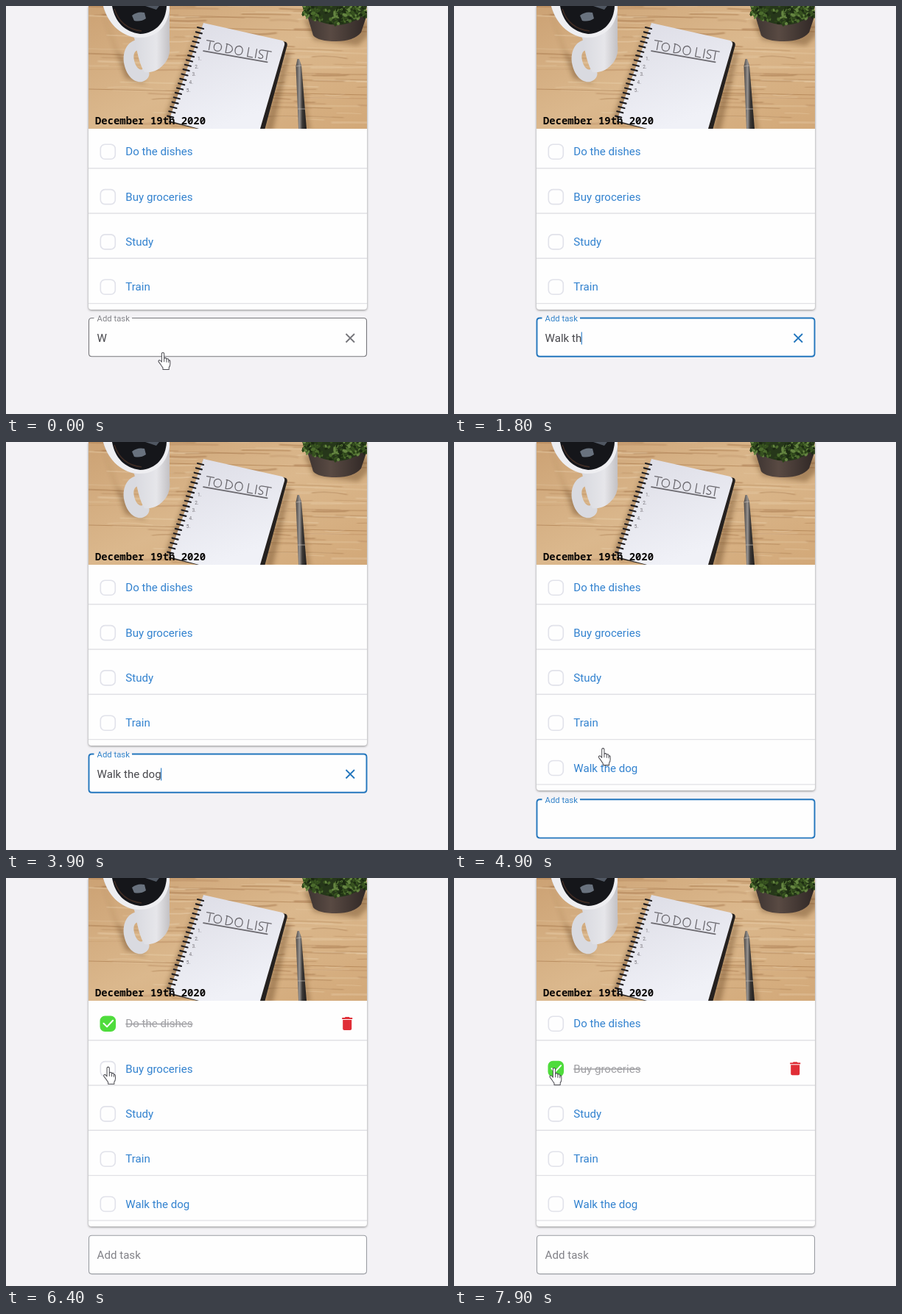
Write an HTML page that moves like this. It is 600 px wide and 555 px high and loops after 8000 ms.

```html
<!DOCTYPE html>
<html lang="en">
<head>
<meta charset="utf-8">
<title>To do list</title>
<style>
  html, body { margin: 0; width: 100%; height: 100%; overflow: hidden; background: #f3f2f5; }
  svg { display: block; width: 600px; height: 555px; font-family: Roboto, Arial, sans-serif; font-size: 15.1px; }
  #card { fill: #fefefe; filter: drop-shadow(0 1px 1.5px rgba(0,0,0,.42)); }
  .done { fill: #a0a0a4; text-decoration: line-through; }
  .open { fill: #3282cf; }
  .date { font: bold 13.9px "Noto Sans Mono", "DejaVu Sans Mono", monospace; }
  .pencil { fill: none; stroke: #6b696f; stroke-width: 1.3; stroke-linecap: round; stroke-linejoin: round; }
</style>
</head>
<body>
<svg viewBox="0 0 600 555">
  <defs>
    <linearGradient id="wood" x2="1" y2="1">
      <stop offset="0" stop-color="#cca274"/><stop offset=".5" stop-color="#dbb88d"/><stop offset="1" stop-color="#d2a878"/>
    </linearGradient>
    <linearGradient id="mug">
      <stop offset="0" stop-color="#c6c7cd"/><stop offset=".45" stop-color="#d8d9df"/><stop offset=".8" stop-color="#e6e6ea"/><stop offset="1" stop-color="#c2c0c3"/>
    </linearGradient>
    <linearGradient id="paper" x2=".4" y2="1">
      <stop offset="0" stop-color="#dcdce5"/><stop offset="1" stop-color="#f0f1f7"/>
    </linearGradient>
    <linearGradient id="metal">
      <stop offset="0" stop-color="#4b4745"/><stop offset=".35" stop-color="#96928f"/><stop offset=".6" stop-color="#3b3836"/><stop offset="1" stop-color="#1f1c1b"/>
    </linearGradient>
    <linearGradient id="pot">
      <stop offset="0" stop-color="#3d3431"/><stop offset=".4" stop-color="#594a43"/><stop offset="1" stop-color="#2f2725"/>
    </linearGradient>
    <clipPath id="photoClip"><rect x="112" width="378" height="167"/></clipPath>
    <filter id="soft"><feGaussianBlur stdDeviation="3"/></filter>
    <filter id="blend"><feGaussianBlur stdDeviation="1.2 .5"/></filter>
  </defs>

  <path id="card"/>

  <g clip-path="url(#photoClip)">
    <rect x="112" width="378" height="167" fill="url(#wood)"/>
    <g id="grain" fill="none" filter="url(#blend)"/>
    <g filter="url(#soft)" fill="#5e3c1e" opacity=".4">
      <path d="M128 0L146 52L162 98L190 106L150 60Z"/>
      <path d="M262 26L216 152L226 160Z"/>
      <path d="M380 60L350 170L362 170L386 64Z"/>
      <path d="M399 82L407 170L413 170Z"/>
      <path d="M404 18L418 46L478 54L492 40V20Z"/>
    </g>

    <path d="M178 46C165 48 158 61 160 77C163 95 174 105 185 103C192 101 196 95 194 89L188 84C183 90 176 84 174 74C172 65 175 59 182 60Z" fill="#d9dae0"/>
    <path d="M132 0C138 24 156 38 174 43C178 62 181 80 188 90Q205 92 217 76Q224 66 222 50V0Z" fill="url(#mug)"/>
    <path d="M132 0C140 27 158 42 181 43C203 43 218 30 222 6V0Z" fill="#eeeef1"/>
    <path d="M144 0C148 22 161 35 182 38C204 37 217 21 218 0Z" fill="#15161a"/>
    <path d="M147 4C153 22 165 32 184 34" fill="none" stroke="#3f2c24" stroke-width="1.6"/>
    <path d="M171 13Q178 7 188 9L190 17Q183 22 174 20Z" fill="#8d9aa9" opacity=".7"/>
    <path d="M189 0L204 5L208 0Z" fill="#6a7482" opacity=".7"/>

    <path d="M268 24L380 49Q383 51 381 56L351 169H268L221 158Z" fill="#25211f"/>
    <path d="M268 23L375 47Q379 49 378 53L345 167H262L221 156Z" fill="url(#paper)"/>
    <g id="rings" stroke="#1f1d20" stroke-width="2.2" stroke-linecap="round"/>
    <g class="pencil" transform="translate(270.5 58.5) rotate(10)">
      <path d="M0-12H10M5-12V0M16-11C9-10 10 0 16 0C23 0 23-11 16-11ZM28-12V0C40 0 39-12 27-12M45-12C38-11 39 0 45 0C52 0 52-12 45-12ZM58-12V0H65M69-12V0M79-12C71-13 72-7 76-6C81-4 79 1 73-1M79-12H89M84-12V0"/>
      <path d="M-2 3H86" stroke-width="1.7"/>
    </g>
    <g id="numbers" fill="#77747a" font-size="6.5"/>

    <path d="M395.5 72L398 72L401 81L408 167H397L393.5 82Z" fill="url(#metal)"/>
    <path d="M394 82L401 81M396 140L406 140" stroke="#bdb5ad" stroke-width=".8"/>

    <path d="M408 10L417 40Q424 48 448 48Q472 48 482 36L490 12Z" fill="url(#pot)"/>
    <path d="M402 0Q406 13 420 19Q450 32 473 20Q488 14 490 0Z" fill="#26371a"/>
    <g id="leaves"/>
  </g>
  <text class="date" x="121" y="161" fill="#080605">December 19th 2020</text>

  <g id="rows"></g>
  <g id="field"></g>
  <path id="hand" fill="#fff" stroke="#4a4a50" stroke-width="1.2" stroke-linejoin="round"
    d="M-2 1.5Q-2-.5 0-.5Q2-.5 2 1.5V9Q2 7 4 7Q6 7 6 9V10Q6 8 8 8.2Q9.5 8.5 9.5 10.5V11Q12 9.5 12 12.5V16Q12 19 10 21V24H0V21.5Q-2 19-3.5 17L-7 13Q-8 11-6 10.5Q-4.5 10-2 13ZM2 9V13M6 10V13.5M9.5 11V14"/>
</svg>
<script>
const LOOP = 8000, FRAME = 100, PITCH = 61.3;
const FOCUS = 300, TYPING = 1020, KEY = 130, SUBMIT = 4200, BLUR = 5500;
const TASK = 'Walk the dog';
const TYPED = TYPING + KEY * (TASK.length - 1);
const LABELS = ['Do the dishes', 'Buy groceries', 'Study', 'Train', TASK];
const CHECKS = [{ on: 5500, off: 7200 }, { on: 6600, off: Infinity }];
const POINTER = [[4700, 216, 470], [5400, 147, 203], [5900, 147, 203], [6500, 138, 262],
  [6700, 138, 262], [6950, 150, 187], [7200, 150, 187], [7700, 136, 259], [8000, 136, 259]];

const $ = id => document.getElementById(id);
const clamp = v => Math.max(0, Math.min(1, v));
const ease = v => (v = clamp(v), v * v * (3 - 2 * v));
const mix = (a, b, k) => a + (b - a) * k;
const times = (n, make) => Array.from({ length: n }, (_, i) => make(i)).join('');

function randomizer(seed) {
  return () => (seed = (seed * 16807) % 2147483647) / 2147483647;
}

function paintPhoto() {
  const rnd = randomizer(71);
  $('grain').innerHTML = times(130, () => {
    const x = 100 + rnd() * 380, y = rnd() * 170, w = 25 + rnd() * 100;
    const color = rnd() < .5 ? '#a4754a' : '#edd6b4';
    return `<path d="M${x} ${y}q${w / 2} ${rnd() * 6 - 3} ${w} ${rnd() * 4 - 1}" stroke="${color}" stroke-width="${.8 + rnd() * 2.2}" opacity="${.15 + rnd() * .3}"/>`;
  }) + '<path d="M112 113L490 121M220 29L490 35" stroke="#8f5b2d" opacity=".4"/>';
  $('rings').innerHTML = times(20, i => {
    const x = 263 - i * 2.15, y = 29 + i * 6.35;
    return `<path d="M${x - 3} ${y}l8 2"/>`;
  });
  $('numbers').innerHTML = times(5, i =>
    `<text x="${260 - i * 3.8}" y="${74 + i * 10.7}">${i + 1}.</text>`);
  const greens = ['#1c2b12', '#36511f', '#4c6c2d', '#658541', '#2b4219'];
  $('leaves').innerHTML = times(150, i => {
    const x = 403 + rnd() * 86, reach = 27 - Math.abs(x - 447) * .3, y = rnd() * reach;
    return `<ellipse cx="${x}" cy="${y}" rx="${1.5 + rnd() * 2.5}" ry="${1 + rnd() * 1.3}" fill="${greens[i % 5]}" transform="rotate(${rnd() * 180} ${x} ${y})"/>`;
  });
}

function checkbox(y, age) {
  const box = (color, line) => `<rect x="128.3" y="${y - 10}" width="20" height="20" rx="6" fill="${color}" stroke="${line}" stroke-width="1.6"/>`;
  if (age < 0) return box('#fefefe', '#e1e2ea');
  if (age < 250) return box('#e6e6e9', '#e6e6e9');
  const drawn = ease((age - 300) / 350) * 20;
  const tick = drawn ? `<path d="M132.5 ${y - .5}l4.6 4.6l8-8.6" fill="none" stroke="#fff" stroke-width="2" stroke-linecap="round" stroke-linejoin="round" stroke-dasharray="${drawn} 30"/>` : '';
  return box('#4fdc3c', '#4fdc3c') + tick;
}

function trash(y) {
  return `<path transform="translate(451.2 ${y - 12.4})" fill="#e02d36" d="M6 19c0 1.1.9 2 2 2h8c1.1 0 2-.9 2-2V7H6v12zM19 4h-3.5l-1-1h-5l-1 1H5v2h14V4z"/>`;
}

function row(label, i, t) {
  const y = 198.3 + i * PITCH, check = CHECKS[i];
  const age = check && t < check.off ? t - check.on : -1;
  return `<path d="M112 ${y + 22.4}H490" stroke="#e1e1e5" stroke-width="1.4"/>`
    + checkbox(y, age)
    + `<text x="162.3" y="${y + 5}" class="${age >= 0 ? 'done' : 'open'}">${label}</text>`
    + (age >= 250 ? trash(y) : '');
}

function typedCount(t) {
  if (t >= SUBMIT) return 0;
  return 1 + Math.max(0, Math.min(TASK.length - 1, Math.floor((t - TYPING) / KEY)));
}

function caretShown(t) {
  if (t < FOCUS || t >= BLUR) return false;
  const typing = t >= TYPING && t < TYPED;
  const shownFrom = t < TYPING ? FOCUS : t < SUBMIT ? TYPED : SUBMIT;
  return typing || (t - shownFrom) % 1000 < 500;
}

function field(t) {
  const top = t < SUBMIT ? 424.5 : 486.3, bottom = top + 52.3;
  const focused = t >= FOCUS && t < BLUR;
  const raised = 1 - ease((t - BLUR) / 200);
  const text = TASK.slice(0, typedCount(t));
  const accent = focused ? '#2376bd' : '#75757a';
  const stroke = focused ? accent : t < FOCUS ? '#77777c' : '#9a9da3';
  const left = mix(146, 119.5, raised), right = mix(146, 171, raised);
  const border = `M${right} ${top}H485.5q4 0 4 4V${bottom - 4}q0 4-4 4H116.5q-4 0-4-4V${top + 4}q0-4 4-4H${left}`;
  const cross = `<path d="M461.5 ${top + 21.5}l11.5 11.5m0-11.5l-11.5 11.5" stroke="${accent}" stroke-width="1.8"/>`;
  const label = `<text x="123.6" y="${mix(top + 31.2, top + 4.6, raised)}" font-size="${mix(15.1, 11.3, raised)}" fill="${focused ? '#2f80c8' : '#818187'}">Add task</text>`;
  return `<rect x="112.5" y="${top}" width="377" height="52.3" rx="4" fill="#fefefe"/>`
    + `<path d="${border}" fill="none" stroke="${stroke}" stroke-width="${focused ? 1.9 : 1.1}"/>`
    + label
    + `<text id="typed" x="123.6" y="${top + 32}" fill="#48484d">${text}</text>`
    + (text ? cross : '')
    + `<path id="caret" stroke="#3685cd" stroke-width="1.2" data-y="${top + 19}"/>`;
}

function placeCaret(t) {
  const caret = $('caret');
  if (caretShown(t)) {
    const x = 123.6 + $('typed').getComputedTextLength();
    caret.setAttribute('d', `M${x} ${caret.dataset.y}v17`);
  }
}

function pointerAt(t) {
  if (t < FOCUS) return [213, 472];
  const next = POINTER.findIndex(p => p[0] > t);
  if (next < 1) return null;
  const [t0, x0, y0] = POINTER[next - 1], [t1, x1, y1] = POINTER[next];
  const k = ease((t - t0) / (t1 - t0));
  return [mix(x0, x1, k), mix(y0, y1, k)];
}

function render(t) {
  const count = t < SUBMIT ? 4 : 5, bottom = t < SUBMIT ? 413 : 474;
  $('card').setAttribute('d', `M112 0H490V${bottom - 4}q0 4-4 4H116q-4 0-4-4Z`);
  $('rows').innerHTML = LABELS.slice(0, count).map((label, i) => row(label, i, t)).join('');
  $('field').innerHTML = field(t);
  placeCaret(t);
  const at = pointerAt(t);
  $('hand').setAttribute('visibility', at ? 'visible' : 'hidden');
  if (at) $('hand').setAttribute('transform', `translate(${at}) scale(.82 .94)`);
}

paintPhoto();
const start = performance.now();
function tick() {
  const t = (performance.now() - start) % LOOP;
  render(Math.floor(t / FRAME) * FRAME);
  requestAnimationFrame(tick);
}
tick();
</script>
</body>
</html>
```
